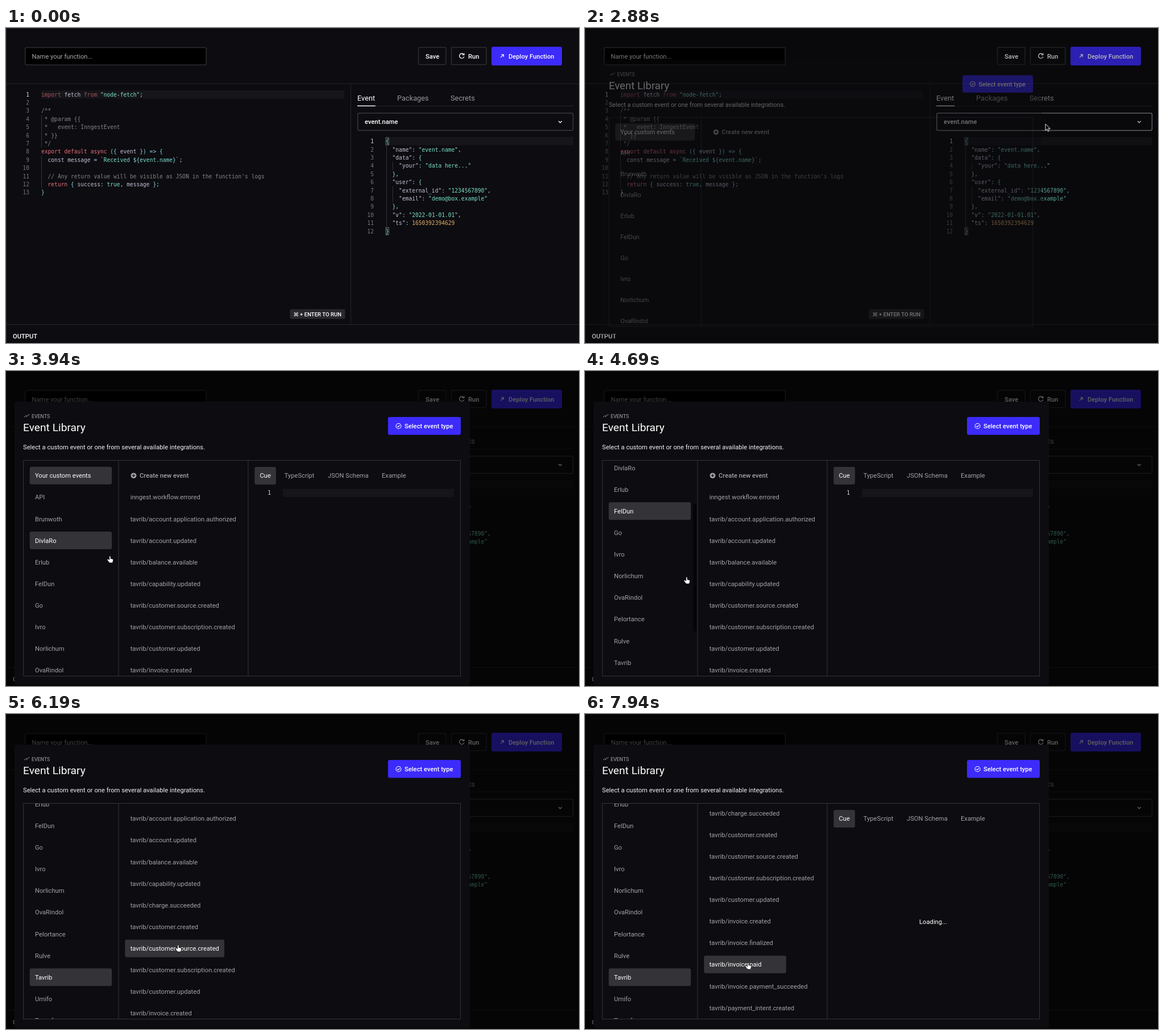
Write an HTML page that moves like this. It is 1008 px wide and 555 px high and loops after 8 s.

```html
<!DOCTYPE html>
<html lang="en">
<head>
<meta charset="utf-8">
<title>Event library</title>
<style>
html, body { margin: 0; width: 100%; height: 100%; overflow: hidden; background: #0d0c10; }
svg { display: block; width: 1008px; height: 555px; }
text { font: 400 11.2px Roboto, sans-serif; white-space: pre; }
.medium { font-weight: 500; }
.code { font: 9.6px "DejaVu Sans Mono", monospace; }
</style>
</head>
<body>
<svg id="stage" viewBox="0 0 1008 555"></svg>
<script>
const LOOP = 8000, PITCH = 38.13, FIRST_ROW = 184.3;
const stage = document.getElementById('stage');

function add(parent, tag, attrs = {}, content) {
  const node = document.createElementNS('http://www.w3.org/2000/svg', tag);
  for (const key in attrs) node.setAttribute(key, attrs[key]);
  if (content !== undefined) node.textContent = content;
  parent.append(node);
  return node;
}
const group = (parent, attrs) => add(parent, 'g', attrs);
const box = (parent, x, y, width, height, fill, attrs = {}) =>
  add(parent, 'rect', { x, y, width, height, fill, ...attrs });
const frame = (parent, x, y, w, h, stroke, fill = 'none', width = 1.5) =>
  box(parent, x, y, w, h, fill, { stroke, rx: 2.5, 'stroke-width': width });
const path = (parent, d, stroke, attrs = {}) =>
  add(parent, 'path', { d, stroke, fill: 'none', ...attrs });
// y is the middle of the capitals
const label = (parent, x, y, content, fill, style = '', attrs = {}) =>
  add(parent, 'text', { x, y: y + 4, fill, class: style, ...attrs }, content);

const INK = { k: '#e8717e', d: '#a4535e', t: '#c3c1d6', s: '#7be0ca', p: '#8cd5e8', c: '#85848a', n: '#e3b168' };

function codeBlock(parent, x, numberX, y, lines) {
  lines.forEach((line, i) => {
    const baseline = y + i * 14.4 + 3.5;
    add(parent, 'text', { x: numberX, y: baseline, fill: i ? '#77767c' : '#d5d5d8', class: 'code', 'text-anchor': 'end' }, i + 1);
    const row = add(parent, 'text', { x, y: baseline, class: 'code' });
    const parts = line.split(/~(\w)/);
    for (let j = 1; j < parts.length; j += 2) add(row, 'tspan', { fill: INK[parts[j]] }, parts[j + 1]);
  });
}

// Page behind the dialog
const page = group(stage);
box(page, 0, 0, 1008, 555, '#0d0c10');
path(page, 'M0 .5H1008M.5 0V555M0 98H1008M606.5 98V522M0 522.5H1008', '#26252a');

frame(page, 33.8, 34.5, 318.5, 30.5, '#2e2d32', '#000');
label(page, 45.5, 49.5, 'Name your function...', '#a9a9ac');
frame(page, 725.5, 34, 48.5, 30.5, '#2e2d32');
label(page, 738, 49.5, 'Save', '#fff', 'medium');
frame(page, 783.5, 34, 61.5, 30.5, '#2e2d32');
path(page, 'M804.8 46.2A4.2 4.2 0 1 0 805.9 50.3M805.9 44.4V47.4H802.6', '#fff', { 'stroke-width': 1.3 });
label(page, 813, 49.5, 'Run', '#fff', 'medium');
box(page, 854, 33, 124, 33, '#3c2bfb', { rx: 3 });
path(page, 'M870 52.2L875 47.2M871.3 46.9H875.3V50.9', '#fff', { 'stroke-width': 1.2 });
label(page, 884, 49.5, 'Deploy Function', '#fff', 'medium');

box(page, 62, 110, 533, 14.4, '#161519');
path(page, 'M62.5 153V210.5M62.5 225V282', '#333238');
codeBlock(page, 62, 41, 117, [
  '~dimport ~tfetch ~dfrom ~s"node-fetch"~p;', '',
  '~c/**', '~c * @param {{', '~c *   event: InngestEvent', '~c * }}', '~c */',
  '~kexport default async ~p({ ~tevent ~p}) => {',
  '~t  const message ~p= ~s`Received ~p${~sevent.name~p}~s`~p;', '',
  "~c  // Any return value will be visible as JSON in the function's logs",
  '~k  return ~p{ ~tsuccess~p: ~strue~p, ~tmessage ~p};', '~p}'
]);
box(page, 499.5, 495.5, 97, 17, '#29282d', { rx: 2.5 });
label(page, 505.5, 504, '⌘', '#fff', '', { style: 'font:9.6px "DejaVu Sans",sans-serif' });
label(page, 517, 503.6, '+ ENTER TO RUN', '#fff', 'medium', { style: 'font-size:9.6px' });
label(page, 12, 542.5, 'OUTPUT', '#fff', 'medium');

[[618, 'Event', '#fff'], [688, 'Packages', '#98979b'], [782, 'Secrets', '#98979b']]
  .forEach(([x, name, fill]) => label(page, x, 124, name, fill, '', { style: 'font-size:12.8px' }));
path(page, 'M618 137.5H998', '#26252a');
path(page, 'M618 137.3H650', '#fff', { 'stroke-width': 1.4 });
const selectFrame = frame(page, 618.8, 150, 378.7, 30.5, '#3a393e');
label(page, 631, 165.2, 'event.name', '#fff', 'medium');
path(page, 'M972 164L974.9 166.8L977.8 164', '#fff', { 'stroke-width': 1.3 });

box(page, 668, 192, 330, 14.6, '#161519');
path(page, 'M669.5 207V351M680.5 236V250M680.5 279V307.5', '#333238');
for (const y of [193, 351.5]) box(page, 668, y, 5.5, 13, '#12201f', { stroke: '#77767c', 'stroke-width': .8 });
codeBlock(page, 668, 647, 199.6, [
  '~p{', '~t  "name"~p: ~s"event.name"~p,', '~t  "data"~p: {', '~t    "your"~p: ~s"data here..."', '~p  },',
  '~t  "user"~p: {', '~t    "external_id"~p: ~s"1234567890"~p,', '~t    "email"~p: ~s"demo@box.example"', '~p  },',
  '~t  "v"~p: ~s"2022-01-01.01"~p,', '~t  "ts"~p: ~n1650392394629', '~p}'
]);

const shade = box(stage, 0, 0, 1008, 555, '#000');

// Dialog
const modal = group(stage);
box(modal, 15, 54, 801, 499, '#0d0c10', { rx: 4 });
[[33, 80.5], [35.3, 78.7], [36.5, 80.3], [38.2, 78.2], [40.4, 77]]
  .forEach(([cx, cy]) => add(modal, 'circle', { cx, cy, r: .75, fill: '#c4c4c8' }));
label(modal, 45, 79, 'EVENTS', '#a9a9ac', '', { style: 'font-size:8.8px' });
label(modal, 30, 102.3, 'Event Library', '#fff', '', { style: 'font-size:19.2px' });
label(modal, 30, 134.3, 'Select a custom event or one from several available integrations.', '#f2f2f4');
box(modal, 672, 81, 128, 31.5, '#3c2bfb', { rx: 3 });
add(modal, 'circle', { cx: 690.5, cy: 97, r: 4.5, fill: 'none', stroke: '#fff', 'stroke-width': 1.1 });
path(modal, 'M688.4 97L690 98.6L692.8 95.6', '#fff', { 'stroke-width': 1.1 });
label(modal, 701, 97, 'Select event type', '#fff', 'medium');

const clip = add(add(stage, 'defs'), 'clipPath', { id: 'panel' });
box(clip, 30, 158, 770, 379, '#fff');
const panel = group(modal, { 'clip-path': 'url(#panel)' });

function makeList(x, names) {
  const root = group(panel);
  const rows = names.map((name, i) => {
    const y = FIRST_ROW + i * PITCH;
    const back = box(root, x - 9.3, y - 15.6, 144.5, 31, '#343337', { rx: 3 });
    return { back, text: label(root, x, y, name, '#a3a2a6') };
  });
  return {
    root, scroll: y => root.setAttribute('transform', `translate(0 ${-y})`),
    light(...active) {
      rows.forEach(({ back, text }, i) => {
        const on = active.includes(i);
        back.setAttribute('visibility', on ? 'inherit' : 'hidden');
        if (on) back.setAttribute('width', Math.max(144.5, text.getComputedTextLength() + 18.5));
        text.setAttribute('fill', on ? '#fff' : '#a3a2a6');
      });
    }
  };
}

const sources = makeList(51, ['Your custom events', 'API', 'Brunwoth', 'DivlaRo', 'Erlub', 'FelDun', 'Go', 'Ivro',
  'Norlichum', 'OvaRindol', 'Pelortance', 'Rulve', 'Tavrib', 'Urnifo', 'Tomufarn']);

const vendorEvents = ['account.application.authorized', 'account.updated', 'balance.available', 'capability.updated',
  'charge.succeeded', 'customer.created', 'customer.source.created', 'customer.subscription.created',
  'customer.updated', 'invoice.created', 'invoice.finalized', 'invoice.paid', 'invoice.payment_succeeded',
  'payment_intent.created', 'payment_intent.succeeded'].map(name => 'tavrib/' + name);
const events = makeList(218.7, vendorEvents);

const createNew = group(panel);
add(createNew, 'circle', { cx: 224.5, cy: 184.3, r: 4.9, fill: '#a3a2a6' });
path(createNew, 'M221.8 184.3H227.2M224.5 181.6V187', '#0d0c10', { 'stroke-width': 1.3 });
label(createNew, 235, 184.3, 'Create new event', '#a3a2a6', 'medium');
const custom = makeList(218.7, ['', 'inngest.workflow.errored',
  ...vendorEvents.filter((_, i) => i < 10 && i !== 4 && i !== 5)]);
custom.light();

const detail = group(panel);
path(detail, 'M426 158V537', '#343338');
box(detail, 437.3, 169, 37.7, 31, '#343337', { rx: 3 });
[[446.5, 'Cue', '#fff'], [489.7, 'TypeScript', '#a3a2a6'], [566, 'JSON Schema', '#a3a2a6'], [661, 'Example', '#a3a2a6']]
  .forEach(([x, name, fill]) => label(detail, x, 184.3, name, fill));
const editor = group(detail);
box(editor, 487, 207.5, 301, 14.5, '#161519');
codeBlock(editor, 487, 466, 214.6, ['']);
const loading = label(detail, 612.5, 366, 'Loading...', '#fff', '', { 'text-anchor': 'middle' });

const thumbs = [box(panel, 190.5, 0, 5.5, 225, '#050507', { rx: 2.7 }), box(panel, 792.3, 0, 5.5, 179, '#050507', { rx: 2.7 })];
path(modal, 'M30.5 157.5H799.5V537.5H30.5ZM198 157V537', '#343338');

const arrow = path(stage, 'M0 0V11.5L2.7 9L4.5 13.2L6.5 12.3L4.7 8.3H8.3Z', '#fff', { fill: '#000', 'stroke-width': .9 });
const hand = path(stage, 'M-1.3 1a1.2 1.2 0 0 1 2.4 0v3.4l3.4.8q1.4.4 1.2 1.9l-.8 3.4q-.3 1.5-1.8 1.5h-3.2q-1 0-1.7-.9l-3-4q-.6-1 .3-1.6t1.8.3l1.4 1z',
  '#000', { fill: '#fff', 'stroke-width': .8 });

// Rows are [time, value, ...]
function tween(rows, t, column = 1, ease = u => u) {
  const next = rows.findIndex(row => row[0] > t);
  if (next === 0) return rows[0][column];
  if (next < 0) return rows.at(-1)[column];
  const a = rows[next - 1], b = rows[next];
  return a[column] + (b[column] - a[column]) * ease((t - a[0]) / (b[0] - a[0]));
}
const step = (rows, t) => rows.findLast(row => row[0] <= t)[1];
const smooth = u => u * u * (3 - 2 * u);
const show = (node, on) => node.setAttribute('visibility', on ? 'inherit' : 'hidden');

// time, opacity, scale, shift
const OPENING = [[2620, 0, .9, -16], [2880, .38, .969, -4.6], [3140, 1, 1, 0]];
const SHADE = [[2560, 0], [2880, .28], [3200, .62]];
const POINTER = [[1750, 745, 300], [2350, 810, 169], [3240, 810, 169], [3600, 250, 255], [3780, 187, 296], [3940, 183, 326],
  [4110, 179, 363], [4950, 179, 363], [5300, 120, 460], [5700, 120, 460], [6130, 303, 407], [7380, 303, 407],
  [7640, 287, 438]];
const SOURCE_SCROLL = [[4230, 0], [4690, 128], [5000, 178]];
const EVENT_SCROLL = [[6440, 0], [6810, 126], [7060, 162.3]];
const SOURCE_HOVER = [[0, -1], [3700, 2], [3800, 3], [3960, 4], [4090, 5], [4960, 10], [5100, 11], [5220, 12], [5800, -1]];
const EVENT_HOVER = [[0, -1], [5900, 7], [6040, 6], [7100, 10], [7500, 11]];
const PICK = 5400, LOADED = 3260, CHOSEN = 7930;

function render(t) {
  const picked = t >= PICK, chosen = t >= CHOSEN;
  selectFrame.setAttribute('stroke', t > 2200 && t < 3150 ? '#85848a' : '#3a393e');
  shade.setAttribute('opacity', tween(SHADE, t));
  modal.setAttribute('opacity', tween(OPENING, t));
  modal.setAttribute('transform',
    `translate(415.5 ${303 + tween(OPENING, t, 3)}) scale(${tween(OPENING, t, 2)}) translate(-415.5 -303)`);

  const sourceY = tween(SOURCE_SCROLL, t), eventY = tween(EVENT_SCROLL, t);
  sources.scroll(sourceY);
  events.scroll(eventY);
  sources.light(picked ? 12 : 0, step(SOURCE_HOVER, t));
  events.light(step(EVENT_HOVER, t));
  show(events.root, picked);
  show(createNew, !picked);
  show(custom.root, !picked && t >= LOADED);
  show(detail, picked ? chosen : t >= LOADED);
  show(editor, !chosen);
  show(loading, chosen);

  thumbs[0].setAttribute('y', 158 + sourceY * .592);
  thumbs[1].setAttribute('y', 158 + eventY * .5);
  show(thumbs[0], t > 4230 && t < 5350);
  show(thumbs[1], t > 6440 && t < 7400);

  const spot = `translate(${tween(POINTER, t, 1, smooth)} ${tween(POINTER, t, 2, smooth)})`;
  arrow.setAttribute('transform', spot);
  hand.setAttribute('transform', spot);
  show(arrow, t >= 1750 && t < 3600);
  show(hand, t >= 3600);
}

const start = performance.now();
function tick() {
  render((performance.now() - start) % LOOP);
  requestAnimationFrame(tick);
}
tick();
</script>
</body>
</html>
```
